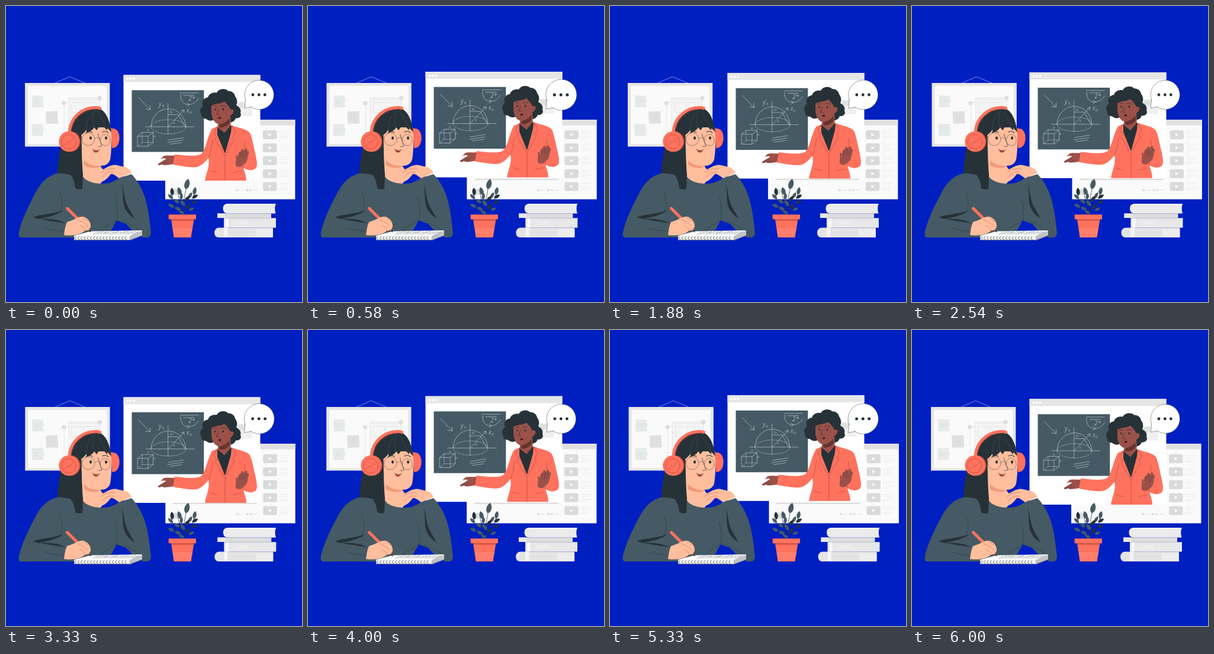
An HTML page that plays this animation: 500 px wide and 500 px high, repeating every 6.04 s.

```html
<!DOCTYPE html>
<html lang="en">
<head>
<meta charset="utf-8">
<style>
html, body { margin: 0; height: 100%; overflow: hidden; background: #001fc1; }
svg { display: block; width: 100vw; height: 100vh; }
text { font-family: "Open Sans", sans-serif; }
.ink { fill: #263238; }
.slate { fill: #455a64; }
.coral { fill: #ff725e; }
.skin { fill: #ffbe9d; }
.brown { fill: #9b5149; }
.line { fill: none; stroke: #263238; stroke-width: .7; stroke-linecap: round; stroke-linejoin: round; }
.thin { stroke-width: .45; }
.bold { stroke-width: 1.1; }
.chalk { fill: none; stroke: #dfe6e8; stroke-width: .55; stroke-linecap: round; }
.chalkText { fill: #dfe6e8; font-size: 10px; font-style: italic; font-weight: 300; }
.seam { fill: none; stroke: #a5453a; stroke-width: .6; stroke-linecap: round; }
.crease { fill: none; stroke: #c8674b; stroke-width: .6; stroke-linecap: round; }
</style>
</head>
<body>
<svg viewBox="0 0 500 500">
  <g id="back">
    <!-- pin board -->
    <path d="M83 130L107.500 119.500L133 130" fill="none" stroke="#c9d0ee" stroke-width=".6"/>
    <path d="M32 130H175.300V237.400H32Z" fill="#e6e6e6"/>
    <path d="M37 135H170.300V233.500H37Z" fill="#fafafa"/>
    <g fill="#e6ebea">
      <path d="M44 151L63.500 151.500L62 155L64.500 160L62 165L64 171L44 171.500Z"/>
      <path d="M43 199.500L63 199L62 204L64.500 209L62 215L63.500 219.500L43.500 220Z"/>
      <path d="M67 178.500L87 177.500L88 198.500L68 199Z" fill="#e0e0e0"/>
    </g>
    <path d="M47 159h11M47 163h8M46 208h11M46 212h8M76 187h5l-3 4" fill="none" stroke="#d4d4d4" stroke-width=".7"/>
    <g fill="#f5f5f5" stroke="#e0e0e0" stroke-width=".8">
      <path d="M98 164L158 155.500V215H98Z" fill="none"/>
      <path d="M106 155H158V212H106Z"/>
      <path d="M106 158H158M111 163H152V180H111ZM131 163V180" fill="none"/>
    </g>
    <g fill="#dedede"><circle cx="97.500" cy="164" r="3.600"/><circle cx="158" cy="155.500" r="3.800"/></g>

    <!-- playlist -->
    <path d="M269 192H488.400V326.400H269Z" fill="#fafafa"/>
    <path d="M269 192H488.400V201.500H269Z" fill="#e0e0e0"/>
    <path d="M282 291.700H423V294H282Z" fill="#dcdcdc"/>
    <circle cx="286" cy="314" r="5.500" fill="#dedede"/>
    <g fill="#dcdcdc">
      <circle cx="390" cy="311" r="2"/><circle cx="407" cy="311" r="2"/>
      <path d="M394 309.500h1v3h-1zM397 310.500h4v1h-4zM411 309.500h4v3h-4zM418 310.500h6v1h-6z"/>
    </g>
    <g id="list"></g>

    <!-- books -->
    <path d="M373 334H455.500Q453 342 455.500 350.500H373Q366.500 349 366.500 342T373 334Z" fill="#ebebeb"/>
    <path d="M373 334H455.500V336H371Z" fill="#f0f0f0"/>
    <path d="M357 350.500H448V358H357Z" fill="#dcdcdc"/>
    <path d="M357 350.500H370V358H357Z" fill="#e8e8e8"/>
    <path d="M368 358.500H456V374.500H368Z" fill="#e8e8e8"/>
    <path d="M371 358.500H376V374.500H371Z" fill="#fafafa"/>
    <text x="385.500" y="370" font-size="9" font-weight="300" fill="#fff">DIARY</text>
    <path d="M359 374.500H451V391H359Q352 390 352 383T359 374.500Z" fill="#e4e4e4"/>
    <path d="M421 377H451V389H421Q423 383 421 377Z" fill="#ededed"/>
    <path d="M368 374.500H374V391H368Z" fill="#f5f5f5"/>
    <path d="M376 383H420M359 390.500H451M368 358.500H456" stroke="#d5d5d5" stroke-width=".7"/>
  </g>

  <g id="lesson">
    <path d="M198.500 116H429.500V294.500H198.500Z" fill="#fff"/>
    <path d="M198.500 116H429.500V128H198.500Z" fill="#e6e6e6"/>
    <g fill="#fff"><circle cx="205" cy="122.300" r="2"/><circle cx="210.800" cy="122.300" r="2"/><circle cx="216.600" cy="122.300" r="2"/></g>
    <path d="M390 161H416V186H390Z" fill="#f0f0f0"/>
    <path d="M392 163H404V172H392Z" fill="#e0e0e0"/>

    <!-- blackboard -->
    <path d="M212.500 141.700H334.300V246H212.500Z" class="slate"/>
    <g class="chalk">
      <path d="M223.500 154L243.500 174.500M243.500 167.500V174.500L236 173.500"/>
      <path d="M273.700 164V216M236 203.500H318M245 203.500A29 30 0 0 1 303.500 203.500"/>
      <path d="M274 203.500L300.500 175.500M296 176.500L301 175L300.500 180M274 183H291L302 203"/>
      <ellipse cx="274.500" cy="203.500" rx="29.500" ry="12" stroke-dasharray="2.500 2"/>
      <path d="M222.500 219.500H240V236.500H222.500ZM222.500 219.500L230 213H248.500L240 219.500M248.500 213V230L240 236.500"/>
      <path d="M222.500 236.500L230 230H248.500M230 230V213" stroke-dasharray="1.500 1.500"/>
      <path d="M274 226L300 222M273 230L299 226M277 233L297 230"/>
      <path d="M294 146.500H325M300 150.500H318M295 149C294 160 301 167 310 166C318 165 323 160 325 156M306 163L310 166L306 169"/>
    </g>
    <g class="chalkText">
      <text x="258" y="169">y</text><text x="263.500" y="171" font-size="7">n</text>
      <text x="305" y="180">x</text><text x="310" y="182" font-size="7">o</text>
      <text x="308" y="160">2</text><text x="314" y="158">+</text>
      <text x="276" y="180.500" style="font-size:6px">5x</text><text x="282" y="200" style="font-size:6px">4</text>
      <text x="238" y="211" style="font-size:6px">a</text><text x="249" y="222" style="font-size:6px">b</text>
    </g>

    <!-- teacher -->
    <path class="ink" d="M330 183C326 176 329 171 333 168C329 161 335 154 341 154C343 147 350 145 356 146C359 139 371 138 375 143C382 143 386 147 387 152C391 157 391 163 389 167C394 170 398 174 396 180C399 185 394 190 388 189C386 195 379 198 374 195L352 191C347 195 341 193 338 190C333 190 329 187 330 183Z"/>
    <path class="brown" d="M359 192L379 184L380 207L370 223L357 207Z"/>
    <path class="brown" d="M347 164C355 159 371 156 378 162C380 167 382 173 383 174C387 177 382 184 378 185C375 194 367 200 360 199C351 198 348 188 347 181Z"/>
    <path class="ink" d="M345 171C347 158 358 153 368 156C377 156 381 166 383 174L379 174C377 169 373 165 369 161C362 165 353 164 347 168Z"/>
    <path d="M361 199C367 198 373 195 377 189L378 196C374 203 366 206 360 204Z" fill="#65332d"/>
    <path class="line" d="M350.500 169.500Q354 166.500 357 169M363 168.500Q368 166 372 169.500M359 174L355.500 182.500L360 183"/>
    <g class="ink"><ellipse cx="353.500" cy="174" rx="1.200" ry="1.800"/><ellipse cx="367" cy="174" rx="1.300" ry="1.900"/></g>
    <ellipse cx="361" cy="188.500" rx="2.600" ry="1.800" fill="#491f1d"/>
    <path class="ink" d="M357 204L369 214L380 201L386 209L378 248H367L354 213Z"/>
    <path class="brown" d="M285 252C277 253 272 251 266 253L261 258C265 257 268 256 270 258L257 266C256 269 260 269 263 267C270 270 277 267 285 266Z"/>
    <path d="M258 267L270 262M265 268L273 264" class="line thin"/>
    <path class="coral" d="M357 203L348 207C340 220 338 240 331 248C326 255 300 252 285 250L282 267.500C297 270 313 273 322 271.500C330 270 337 262 342 256C345 270 338 281 336 294.500H406C406 287 403 280 401 273C408 277 415 278 420 275C426 272 424 264 422 252C418 236 416 222 412 214C407 207 394 206 381 201L380 213L370 249L357 217Z"/>
    <path class="seam" d="M357 203L351 214L356 222L353 224L369 252M381 201L388 213L383 221L386 224L370 252V294M349 226C347 238 346 247 342 256M403 228C405 242 402 256 401 273M345 278L357 281M384 281L397 278"/>
    <path class="brown" d="M389 270C386 265 390 260 388 253C390 249 391 252 392 255C392 249 393 245 396 246C398 239 401 239 401 244C406 238 409 240 407 245C411 243 411 247 409 251C408 260 406 265 401 267C400 270 395 273 389 270Z"/>
    <path class="line thin" d="M396 246L395 255M401 244L399 255M407 245L402 256"/>
  </g>

  <g id="bubble">
    <path d="M404.500 158L403.500 172.500L415 170.500" fill="#fff" class="line thin" style="fill:#fff"/>
    <circle cx="427.800" cy="150" r="24.600" fill="#fff" stroke="#263238" stroke-width=".45"/>
    <path d="M405.500 157L405 171L415 169Z" fill="#fff"/>
    <g class="ink"><circle cx="417" cy="150" r="2.400"/><circle cx="427.300" cy="150" r="2.400"/><circle cx="437.300" cy="150" r="2.400"/></g>
  </g>

  <!-- plant -->
  <path class="line" d="M299 353C298 334 303 317 305 304M299 350C295 335 291 322 290 312M299 350C291 343 283 335 280 319M300 349C309 341 315 331 318 315"/>
  <g id="leaves"></g>
  <path class="coral" d="M279 360H317.500L312.500 391H283.500Z"/>
  <path d="M278.500 360H317.800L317.400 362.500H279.200Z" fill="#c9503f"/>
  <path class="coral" d="M274.700 352.300H321V360.300H274.700Z"/>
  <path d="M282 376.500H315M282.500 379H314.500M283.500 388.500H312.500" stroke="#ffb3a7" stroke-width=".5"/>
  <path d="M284 383.500H313" stroke="#ffb3a7" stroke-width="6" stroke-dasharray=".6 2.400"/>

  <!-- student -->
  <path class="coral" d="M177 207C188 205 192.500 215 191.500 226C190 236 186 240 179 240Z"/>
  <path class="ink" d="M112 202C112 186 130 172 152 172C167 174 175 194 178 213L164 262L130 290L87 284C87 266 91 248 95 228Z"/>
  <path class="skin" d="M127 205H177C179 220 178.500 246 176 259C174 267 167 270 159 270L171 286L158 302C145 300 133 295 129 287Z"/>
  <path d="M132 260C138 268 149 271 161 270C155 275 143 275 132 269Z" fill="#f29a78"/>
  <path class="slate" d="M89 282C70 286 58 299 49 317C36 341 25 365 21.500 384Q21 391 25 391H118L150 382H176L187 362L203 368L214 380H230V391H240Q246 388 244.500 380C242 354 238 327 229 309C224 299 219 291 212 284L190 291C181 298 171 301 158 300C144 299 135 295 129 288Z"/>
  <path class="ink" d="M45 357C60 351 78 352 97 345C82 356 66 357 54 360C74 358 90 361 101 367C83 364 63 362 45 357ZM195 299C200 311 199 326 206 339C210 347 214 352 217 359C207 352 200 345 198 331C197 319 198 312 195 299Z"/>
  <path class="line thin" d="M90 312C97 325 96 340 90 350M66 375C74 378 86 379 98 381M187 362C190 350 188 336 184 324M224 377C214 371 204 366 196 362M158 381C164 374 174 370 186 363"/>

  <path class="skin" d="M156 292C162 284 158 277 166 275C177 268 184 267 192 270C200 272 207 271 212 282L191 291C185 287 181 283 177 284C173 289 168 296 160 297Z"/>
  <path class="crease" d="M160 282C165 276 175 274 184 275M163 289C167 282 175 279 181 281"/>

  <path class="ink" d="M110 205C114 187 131 173 152 172C168 173 175 192 178 213L171 206V210C166 206 162 199 160 192C159 200 157 205 153 210L149 205C146 210 141 213 136 214V209C132 214 129 217 126 218C127 241 128 260 130 285L129 309C125 310 121 310 117 308C116 296 112 286 104 281L87 283C87 266 91 250 94 230Z"/>
  <path class="line" d="M152 175C142 181 136 193 135 209M154 176C160 188 166 198 171 206M149 179C146 190 146 198 149 205" style="stroke:#54636b;stroke-width:.4"/>
  <path d="M107 214C108 190 127 171 153 171.500C156 171.500 158 172 160 174" fill="none" stroke="#ff725e" stroke-width="5"/>
  <path d="M110 213C112 192 131 174 156 174" class="seam"/>
  <ellipse cx="109.500" cy="229" rx="16" ry="17" fill="#c9503f"/>
  <circle cx="106.500" cy="229" r="17.300" class="coral"/>
  <circle cx="106" cy="229.500" r="12.300" class="seam"/>
  <path class="seam" d="M99 235L105 229L107 231L114 223"/>

  <g class="line">
    <path class="thin" d="M128.200 225a10.800 10.800 0 1 0 21.600 0a10.800 10.800 0 1 0 -21.600 0M159 226C160 218 167 214 173 219C178 224 177 235 169 236C163 236 159 232 159 226ZM128 222L125 221M150 224Q155 220 159 224"/>
    <path class="bold" d="M135 214.500Q140 210.500 146 213.500M163 213Q168 210 173 214"/>
    <path d="M155.500 216C157 224 160 230 162 236Q159 239 156 237M146 242Q152 246 158 243"/>
  </g>
  <path d="M147 243Q152 246 157 244Q155 248 151 247.500Q148 247 147 243Z" fill="#a83c35"/>
  <g class="ink"><ellipse cx="143" cy="223" rx="2" ry="2.700"/><ellipse cx="169" cy="223" rx="2" ry="2.700"/></g>

  <!-- notebook, hand and pencil -->
  <path d="M115 388L143 380.500L230 379L209 388.500Z" fill="#fff"/>
  <path d="M209 388.500L230 379V388L209 396Z" fill="#e6e6e6"/>
  <path d="M115 388H209V395.500H115Z" fill="#f3f3f3"/>
  <path d="M209 390.500L230 381.500M209 392.500L230 384M209 394.500L230 386.500M115 395.500H209L230 388" class="line thin"/>
  <path id="scribble" class="line thin"/>
  <path id="spiral" class="line"/>
  <path d="M140 376L144.500 382.500L137.500 379.500Z" class="ink"/>
  <path d="M103.500 342L139 377" stroke="#ff725e" stroke-width="5" stroke-linecap="round"/>
  <path class="skin" d="M98 387C99 378 100 371 103 365C110 363 116 360 120 358C127 355 132 355 135 358C141 361 143 367 143 372C143 376 138 379 133 380C126 386 114 389 98 387Z"/>
  <path class="crease" d="M121 361C128 363 133 367 138 372M125 371C131 373 134 377 133 380M130 357L140 364"/>
</svg>
<script>
const $ = id => document.getElementById(id);
const range = n => [...Array(n).keys()];

$('list').innerHTML = range(5).map(i => {
  const y = 210 + i * 21.9;
  return `<rect x="434" y="${y}" width="23.500" height="15" rx="3" fill="#dadada"/>
    <path d="M443.500 ${y + 4.700}l5.500 2.800l-5.500 2.800z" fill="#fafafa"/>
    <path d="M462 ${y + 2}h17M462 ${y + 5.500}h14M462 ${y + 10}h18M462 ${y + 13}h11" stroke="#e6e6e6" stroke-width=".7"/>`;
}).join('');

// Each leaf: tip x, tip y, lean in degrees, length
const leaves = [
  [308, 292, 14, 18], [291, 306, -17, 14], [280, 307, -5, 13], [320, 306, 12, 13],
  [314, 315, 30, 11], [324, 319, 60, 11], [274, 318, -45, 11], [297, 316, 8, 11],
  [310, 321, 40, 12], [284, 326, -50, 11], [295, 328, -35, 12], [323, 329, 65, 10],
  [274, 335, -65, 11], [285, 340, -65, 11], [311, 335, 45, 11], [318, 341, 65, 10],
  [292, 346, -60, 10]
];
$('leaves').innerHTML = leaves.map(([x, y, lean, h], i) =>
  `<path class="${i % 3 == 2 ? 'ink' : 'slate'}" transform="translate(${x} ${y}) rotate(${lean})"
    d="M0 0C${h * .34} ${h * .3} ${h * .3} ${h * .85} 0 ${h}C${-h * .3} ${h * .85} ${-h * .34} ${h * .3} 0 0"/>`
).join('');

$('spiral').setAttribute('d', range(17).map(i => `M${118 + i * 5.300} 389.500c-3 1 -2 6 1 5.500`).join(''));
$('scribble').setAttribute('d', range(16).map(i =>
  `M${147 + i * 4.500} ${386 - i % 3 * .3}l4 -2.500m1 -.6l${2 + i % 4} -1.500`).join(''));

// Linear interpolation through keyframes
function tween(stops, values, p) {
  let i = 0;
  while (i < stops.length - 2 && p > stops[i + 1]) i++;
  return values[i] + (values[i + 1] - values[i]) * (p - stops[i]) / (stops[i + 1] - stops[i]);
}

const shakeStops = range(11).map(i => i / 10);
const shake = [0, -1, 2, -4, 4, -4, 4, -4, 2, -1, 0];
const beatStops = [0, .14, .28, .42, .7, 1];
const beat = [1, 1.08, 1, 1.08, 1, 1];
const unit = .7;
const start = performance.now();

function draw(now) {
  const t = Math.min(Math.max(0, now - start) % 6040, 6000);
  const p = t % 1500 / 1500;
  const x = unit * tween(shakeStops, shake, t / 6000);
  const y = .5 + unit * tween([0, .5, 1], [0, -10, 0], p);
  const s = tween(beatStops, beat, p);
  $('back').setAttribute('transform', `translate(${x} 0)`);
  $('lesson').setAttribute('transform', `translate(0 ${y})`);
  $('bubble').setAttribute('transform', `translate(428 150) scale(${s}) translate(-428 -150)`);
  requestAnimationFrame(draw);
}
draw(start);
</script>
</body>
</html>
```
